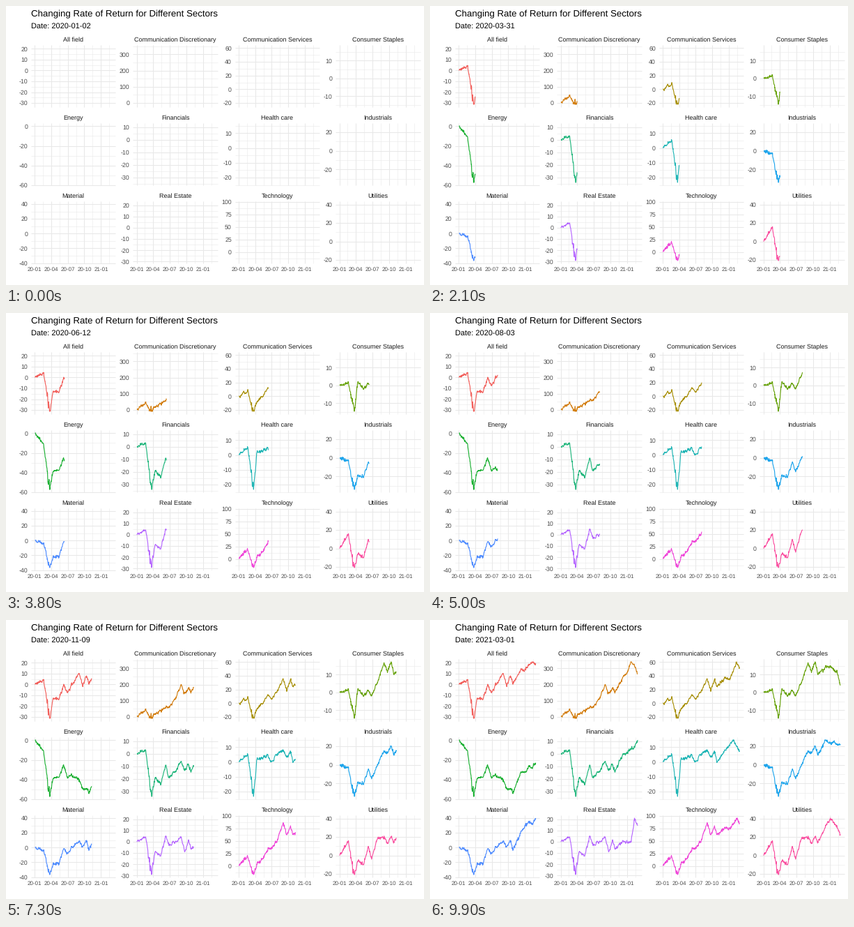
These frames come from a looping animation (600x400 px, 10000 ms). A matplotlib script:

```python
import numpy as np
import matplotlib.pyplot as plt
from matplotlib.animation import FuncAnimation

plt.rcParams["font.family"] = "Liberation Sans"
plt.rcParams["text.hinting"] = "none"

W, H, DPI = 600, 400, 100
PT = 72 / DPI                      # points per pixel
FRAMES, SPAN = 100, 424            # SPAN: days covered by one loop
START = np.datetime64("2020-01-02")

LEFTS, TOPS = [36.0, 182.4, 328.8, 473.4], [56.0, 168.0, 280.0]
PW, PH = 121.27, 89.0
PAD = 0.05 / 1.1                   # share of the panel outside the data range
GRID, AXIS_TEXT, STRIP_TEXT = "#E8E8E8", "#4D4D4D", "#1A1A1A"

# Quarter starts, in days since START
QUARTERS = np.arange("2020-01", "2021-07", 3, dtype="datetime64[M]")
QUARTER_DAYS = (QUARTERS.astype("datetime64[D]") - START).astype(int)

# Market turning points shared by all sectors, in days since START
TURNS = [0, 48, 81, 100, 132, 158, 176, 210, 244,
         265, 284, 300, 340, 368, 388, 406, 424]

DAYS = np.array([d for d in range(SPAN + 1) if (d + 3) % 7 < 5 or d in TURNS])
CRASH = np.exp(-((DAYS - 76) / 15) ** 2)

rng = np.random.default_rng(2020)


def wobble():
    """Unit noise that fades back to its mean within a few days."""
    noise = rng.normal(size=len(DAYS))
    for k in range(1, len(noise)):
        noise[k] = 0.5 * noise[k - 1] + 0.87 * noise[k]
    return noise


market = wobble()

fig = plt.figure(figsize=(W / DPI, H / DPI), dpi=DPI, facecolor="white")
ax = fig.add_axes([0, 0, 1, 1])
ax.set(xlim=(0, W), ylim=(H, 0))
ax.axis("off")
sectors = []


def label(x, y, text, size, color="black", ha="left"):
    return ax.text(x, y, text, fontsize=size * PT, color=color, ha=ha, va="baseline")


def rule(xs, ys, major):
    ax.plot(xs, ys, color=GRID, lw=(1.07 if major else 0.53) * PT,
            solid_capstyle="butt", zorder=2 if major else 1)


def daily(turns, scale):
    """Join the turning points with daily swings, wilder the deeper the crash."""
    turns = np.array(turns)
    drop = (turns[1] - turns[2]) * scale
    size = (1.2 + 0.05 * drop * CRASH) * np.clip(DAYS / 5, 0, 1)
    swing = (0.6 * market + 0.8 * wobble()) * size / scale
    swing[np.isin(DAYS, TURNS)] = 0
    return np.clip(np.interp(DAYS, TURNS, turns) + swing, turns.min(), turns.max())


def sector(name, color, step, turns):
    """Draw one panel and register its curve."""
    row, col = divmod(len(sectors), 4)
    left, top = LEFTS[col], TOPS[row]
    right, bottom = left + PW, top + PH
    lo, hi = min(turns), max(turns)
    scale = PH / 1.1 / (hi - lo)

    def px(day):
        return left + PW * (PAD + day / SPAN / 1.1)

    def py(value):
        return top + PH * PAD + (hi - value) * scale

    for day, after, month in zip(QUARTER_DAYS, QUARTER_DAYS[1:], QUARTERS):
        rule([px(day)] * 2, [top, bottom], True)
        rule([px((day + after) / 2)] * 2, [top, bottom], False)
        if row == 2:
            label(px(day), 380.4, str(month)[2:], 8, AXIS_TEXT, "center")

    margin, half = (hi - lo) * 0.05, step / 2
    first, last = np.ceil((lo - margin) / half), np.floor((hi + margin) / half)
    for k in range(int(first), int(last) + 1):
        y = py(k * half)
        major = k % 2 == 0
        rule([left, right], [y, y], major)
        if major:
            label(left - 4.95, y + 3.15, str(k // 2 * step), 8.8, AXIS_TEXT, "right")
    label((left + right) / 2, top - 4.9, name, 9, STRIP_TEXT, "center")

    line, = ax.plot([], [], color=color, lw=1.15 * PT, zorder=3,
                    solid_capstyle="butt", solid_joinstyle="round")
    sectors.append((line, px(DAYS), py(daily(turns, scale))))


sector("All field", "#F2605C", 10,
       [0, 4.5, -31.1, -13, -13.5, -1, -7, 1, 10, 0, 8, 1, 13, 14.5, 18, 20.8, 19.5])
sector("Communication Discretionary", "#D27C0C", 100,
       [0, 43, -10.5, 15, 35, 57, 55, 107, 197, 145, 178, 155, 240, 282, 341, 320, 265])
sector("Communication Services", "#A8900A", 20,
       [0, 7.5, -22, -8, 0, 11, 7, 16, 36, 19, 34, 25, 37, 35.5, 46, 60.4, 52])
sector("Consumer Staples", "#68A30C", 10,
       [0, 1.5, -14.5, 2, -2, 1, -2, 6, 16.5, 12, 17.2, 10, 14, 15, 12.5, 11.5, 4])
sector("Energy", "#1CB033", 20,
       [0.2, -11, -57.2, -39, -38, -25, -37, -36, -40, -49, -49, -53, -33, -32, -27, -28, -23])
sector("Financials", "#1DB57A", 10,
       [0, 3.3, -33.9, -19, -24, -9, -19, -14, -6, -13, -8, -14, -1, 1, 4, 6, 11.1])
sector("Health care", "#1FB5B5", 10,
       [0, 5.5, -23.3, 2, 2, 5, 0, 5, 8, 3.2, 7.5, 0, 7.5, 11.5, 14.9, 11, 7.5])
sector("Industrials", "#1FA5EC", 20,
       [0, -3, -33.7, -19, -20, -5, -15, 0, 15, 13, 20, 10, 26.3, 22.5, 24, 22, 22])
sector("Material", "#4F8CFF", 20,
       [0, -3, -36.6, -22, -21, -2, -9, 1, 9, 2, 9, -3, 19, 32.5, 33, 33, 40])
sector("Real Estate", "#B566FF", 10,
       [0, 4.5, -29.1, -9, -12, 5, -3, 0, 4, -8.5, 1, -6, 0, 0, 0, 21.2, 14.5])
sector("Technology", "#EF45D8", 25,
       [0, 19, -17.2, 3, 15, 31, 33, 49, 86, 62, 78, 62, 76, 74.5, 83, 95.2, 84])
sector("Utilities", "#FA4FA0", 20,
       [0, 16, -20.7, -6, -10, 10, -4, 19, 20, 14, 20, 14, 30, 40.6, 36, 31, 23])

label(36, 15, "Changing Rate of Return for Different Sectors", 13.2)
date = label(36, 32, "", 11)


def update(i):
    now = SPAN * i / (FRAMES - 1)
    date.set_text(f"Date: {START + int(now)}")
    shown = np.searchsorted(DAYS, now, side="right")
    for line, xs, ys in sectors:
        tip_x, tip_y = np.interp(now, DAYS, xs), np.interp(now, DAYS, ys)
        line.set_data(np.append(xs[:shown], tip_x), np.append(ys[:shown], tip_y))
    return [date] + [s[0] for s in sectors]


anim = FuncAnimation(fig, update, frames=FRAMES, interval=1000 // 10,
                     repeat=True, repeat_delay=0, blit=False)
plt.show()
```
